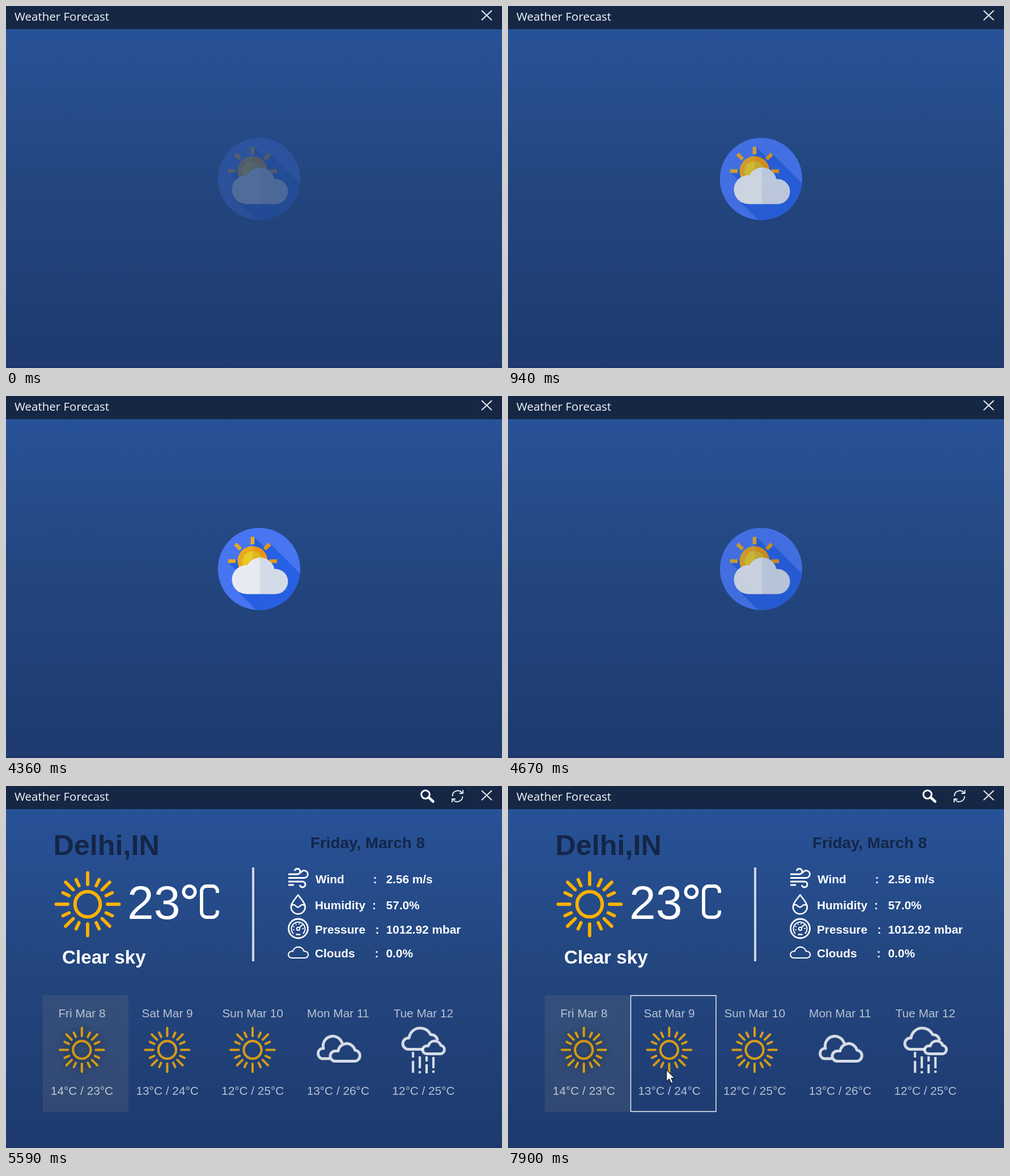
These frames come from a looping animation (875x640 px, 8 s). An HTML page with a canvas:

```html
<!DOCTYPE html>
<html lang="en">
<head>
<meta charset="utf-8">
<title>Weather Forecast</title>
<style>
html, body { margin: 0; width: 100%; height: 100%; overflow: hidden; background: #23467f; }
canvas { display: block; }
</style>
</head>
<body>
<canvas id="stage" width="875" height="640"></canvas>
<script>
const stage = document.getElementById('stage');
const ctx = stage.getContext('2d');
const LOOP = 8000;
const STEPS = [0, 160, 320, 470, 630, 780, 940, 1100, 1260, 1410, 4360, 4500, 4670,
  4810, 4980, 5230, 5590, 7080, 7260, 7400, 7560, 7730, 7900];
const READY = 5590;
const NAVY = '#142648', AMBER = '#ffb100';
const SANS = '"Liberation Sans", Arial, sans-serif';
const CARD = { x: 65.5, y: 370.5, w: 150.5, h: 205 };
const POINTER = [[7080, 203, 609], [7260, 186, 517], [7400, 199, 504],
  [7560, 221, 490], [7730, 244, 496], [7900, 279, 501]];

function line(c, d, color, width, cap = 'butt') {
  c.strokeStyle = color;
  c.lineWidth = width;
  c.lineCap = cap;
  c.lineJoin = 'round';
  c.stroke(new Path2D(d));
}

function fill(c, d, color) {
  c.fillStyle = color;
  c.fill(new Path2D(d));
}

function disc(c, x, y, r, color) {
  c.fillStyle = color;
  c.beginPath();
  c.arc(x, y, r, 0, Math.PI * 2);
  c.fill();
}

function ring(c, x, y, r, color, width) {
  c.strokeStyle = color;
  c.lineWidth = width;
  c.beginPath();
  c.arc(x, y, r, 0, Math.PI * 2);
  c.stroke();
}

function text(str, x, y, size, color, weight = '', align = 'left', family = SANS) {
  ctx.font = `${weight} ${size}px ${family}`;
  ctx.fillStyle = color;
  ctx.textAlign = align;
  ctx.fillText(str, x, y);
}

function makeBadge() {
  const badge = document.createElement('canvas');
  badge.width = 875;
  badge.height = 640;
  const c = badge.getContext('2d');
  const left = '#ffb413', right = '#ffa000';

  c.save();
  c.beginPath();
  c.arc(446.4, 305.8, 72.6, 0, Math.PI * 2);
  c.clip();
  c.fillStyle = '#4c7bff';
  c.fillRect(370, 230, 152, 152);
  fill(c, 'M438 249L456 267L466 261L521 316V382H445L411 348L440 330L407 308L393 295L435 280Z', '#2763ee');
  c.restore();

  for (let i = 0; i < 5; i++) {
    c.save();
    c.translate(435, 292);
    c.rotate((i - 2) * Math.PI / 4);
    c.fillStyle = i > 2 ? right : left;
    c.fillRect(-3.3, -43, 6.6, 13);
    c.restore();
  }
  twoTone(c, 435, left, right, () => c.arc(435, 292, 26.5, 0, Math.PI * 2));
  twoTone(c, 435, '#fed91a', '#f0c41b', () => c.arc(435, 292, 17.6, 0, Math.PI * 2));
  twoTone(c, 448, '#fdfdfe', '#e7ecf5', () => {
    for (const [x, y, r] of [[424, 324.5, 25.5], [448.5, 311, 25.5], [475.2, 328, 22.3]]) {
      c.moveTo(x + r, y);
      c.arc(x, y, r, 0, Math.PI * 2);
    }
    c.rect(424, 311, 51, 39.2);
  });
  return badge;
}

// Fills one outline with different colours on each side of a vertical split.
function twoTone(c, split, left, right, trace) {
  c.beginPath();
  trace();
  c.save();
  c.clip();
  c.fillStyle = left;
  c.fillRect(370, 230, split - 370, 152);
  c.fillStyle = right;
  c.fillRect(split, 230, 522 - split, 152);
  c.restore();
}

const badge = makeBadge();

function drawWindow() {
  const sky = ctx.createLinearGradient(0, 41, 0, 640);
  sky.addColorStop(0, '#285298');
  sky.addColorStop(0.45, '#23467f');
  sky.addColorStop(1, '#1e3a6f');
  ctx.fillStyle = sky;
  ctx.fillRect(0, 0, 875, 640);
  ctx.fillStyle = '#1c366a';
  ctx.fillRect(0, 637, 875, 3);
  ctx.fillStyle = '#152745';
  ctx.fillRect(0, 0, 875, 41);
  text('Weather Forecast', 15, 26, 20.5, '#f4f6f9', '', 'left', '"Open Sans", "Noto Sans", sans-serif');
  line(ctx, 'M839 8L857 25M857 8L839 25', '#dde1e8', 2.3);
}

function drawSun(x, y, scale) {
  ctx.save();
  ctx.translate(x, y);
  ctx.scale(scale, scale);
  ring(ctx, 0, 0, 22.3, AMBER, 6);
  for (let quarter = 0; quarter < 4; quarter++) {
    for (const [deg, near, far] of [[0, 35, 55.5], [25, 36, 48], [45, 36, 55], [65, 36, 48]]) {
      ctx.save();
      ctx.rotate((quarter * 90 + deg) * Math.PI / 180);
      line(ctx, `M0 ${-near}V${-far}`, AMBER, 5.8, 'round');
      ctx.restore();
    }
  }
  ctx.restore();
}

function drawClouds() {
  line(ctx, 'M571 482H557a9.5 9.5 0 0 1 0-18h3a17 17 0 0 1 33-9', '#fff', 5);
  line(ctx, 'M581 486.5a9 9 0 0 1 0-18h5a15 15 0 0 1 29.5-1.5a9.8 9.8 0 0 1 0 19.5z', '#fff', 5);
}

function drawRain() {
  line(ctx, 'M736 465.5H710a10 10 0 0 1 0-20h1a20 20 0 0 1 38-6q10 0 12.5 10', '#fff', 5);
  line(ctx, 'M742 473.5a7 7 0 0 1 0-14h3a11.5 11.5 0 0 1 22-1a7.6 7.6 0 0 1 0 15z', '#fff', 5);
  line(ctx, 'M718 470v10m0 6v21M730 478v21m0 5v4M742 478v9m0 5v16M754 479v20m0 4v4', '#fff', 4.2);
}

function drawToolbar() {
  ring(ctx, 740, 15, 7.3, '#fff', 3);
  line(ctx, 'M745.5 20L753.5 27.5', '#fff', 4.5, 'round');
  line(ctx, 'M787.5 18a9.5 9.5 0 0 1 17-6M805.5 18a9.5 9.5 0 0 1-17 6', '#e8ebf0', 1.9);
  line(ctx, 'M806 7v6h-6M787 29v-6h6', '#e8ebf0', 1.9);
}

function drawGauges() {
  line(ctx, 'M498 156h16a4.9 4.9 0 1 0-4.8-6M498 162.5h28a6.5 6.5 0 1 0-6.4-8' +
    'M498 169h25a5 5 0 1 1-4.8 6.2M498 175h10', '#fff', 2.9);
  line(ctx, 'M515.3 192.5c4 6 12.5 13.5 12.5 21.3a12.5 12.5 0 0 1-25 0c0-7.8 8.5-15.3 12.5-21.3z' +
    'M503 212q4-4.5 8 0t8 0t8.5 0', '#fff', 2.6);
  ring(ctx, 515.5, 252, 17, '#fff', 2.8);
  line(ctx, 'M507 261a12 12 0 1 1 17 0', '#fff', 2);
  ctx.setLineDash([1.8, 4]);
  line(ctx, 'M508 255a8.3 8.3 0 1 1 15 0', '#fff', 2.5);
  ctx.setLineDash([]);
  ring(ctx, 515.5, 252.5, 2.7, '#fff', 2);
  line(ctx, 'M517.5 250.5L523 245M511.5 262.5h8', '#fff', 2.3);
  line(ctx, 'M504 304a5.9 5.9 0 0 1 0-11.8h2a10.2 10.2 0 0 1 19.7 0h1.6a5.9 5.9 0 0 1 0 11.8z', '#fff', 2.1);
}

function drawToday() {
  text('Delhi,IN', 83.5, 121.5, 50.3, NAVY, 'bold');
  text('Friday, March 8', 537, 110, 27.8, NAVY, 'bold');
  drawSun(144, 209, 1);
  text('23', 214, 234.5, 84, '#fff');
  ring(ctx, 323.5, 187, 10.2, '#fff', 5.5);
  line(ctx, 'M373 189v-3a9 9 0 0 0-9-9h-10a9 9 0 0 0-9 9v37a9 9 0 0 0 9 9h10a9 9 0 0 0 9-9v-3', '#fff', 5.8);
  text('Clear sky', 99, 314, 33.2, '#fff', 'bold');
  ctx.fillStyle = '#ced4df';
  ctx.fillRect(434, 144, 4, 166);

  drawGauges();
  const rows = [['Wind', 651, '2.56 m/s', 171.5], ['Humidity', 649.5, '57.0%', 218],
    ['Pressure', 655, '1012.92 mbar', 260.5], ['Clouds', 654, '0.0%', 303]];
  for (const [label, colon, value, y] of rows) {
    text(label, label === 'Wind' ? 546 : 545, y, 20.8, '#fff', 'bold');
    text(':', colon, y, 20.8, '#fff', 'bold', 'center');
    text(value, 670.5, y, 20.8, '#fff', 'bold');
  }
}

function drawForecast() {
  const days = [['Fri Mar 8', '14°C / 23°C'], ['Sat Mar 9', '13°C / 24°C'], ['Sun Mar 10', '12°C / 25°C'],
    ['Mon Mar 11', '13°C / 26°C'], ['Tue Mar 12', '12°C / 25°C']];
  ctx.fillStyle = 'rgba(105,112,122,.25)';
  ctx.fillRect(65, 370, 151, 206);
  days.forEach(([day, range], i) => {
    const x = 134 + i * 150.6;
    text(day, x, 409, 20.8, 'rgba(255,255,255,.68)', '', 'center');
    text(range, x, 546, 20.8, 'rgba(255,255,255,.68)', '', 'center');
    ctx.save();
    ctx.globalAlpha = 0.81;
    if (i === 0) {
      ctx.shadowColor = 'rgba(0,0,0,.5)';
      ctx.shadowBlur = 13;
    }
    if (i < 3) drawSun(x - 0.2, 466.5, 0.7);
    else if (i === 3) drawClouds();
    else drawRain();
    ctx.restore();
  });
}

function drawPointer(time) {
  const spot = POINTER.find(p => p[0] === time);
  if (!spot) return;
  const [, x, y] = spot;
  const hovered = time === 7400 ? 0 : time > 7400 ? 1 : -1;
  if (hovered >= 0) {
    ctx.strokeStyle = '#f4f6fa';
    ctx.lineWidth = 1.4;
    ctx.strokeRect(CARD.x + hovered * 151, CARD.y, CARD.w, CARD.h);
  }
  ctx.save();
  ctx.translate(x + 0.5, y + 0.8);
  const arrow = 'M0 0V20.5L4.8 16L8.2 23.7L11.7 22.2L8.4 14.8H14.6Z';
  fill(ctx, arrow, '#fff');
  line(ctx, arrow, '#10141c', 1.1);
  ctx.restore();
}

function badgeAlpha(time) {
  return time < 4360 ? Math.min(1, 0.21 + time * 0.000603) : 0.9 - (time - 4360) * 0.00046;
}

function draw(time) {
  drawWindow();
  if (time < READY) {
    ctx.globalAlpha = badgeAlpha(time);
    ctx.drawImage(badge, 0, 0);
    ctx.globalAlpha = 1;
    return;
  }
  drawToolbar();
  drawToday();
  drawForecast();
  drawPointer(time);
}

let shown = -1;
function tick() {
  const now = performance.now() % LOOP;
  const step = STEPS.filter(s => s <= now).pop();
  if (step !== shown) {
    draw(step);
    shown = step;
  }
  requestAnimationFrame(tick);
}
tick();
</script>
</body>
</html>
```
